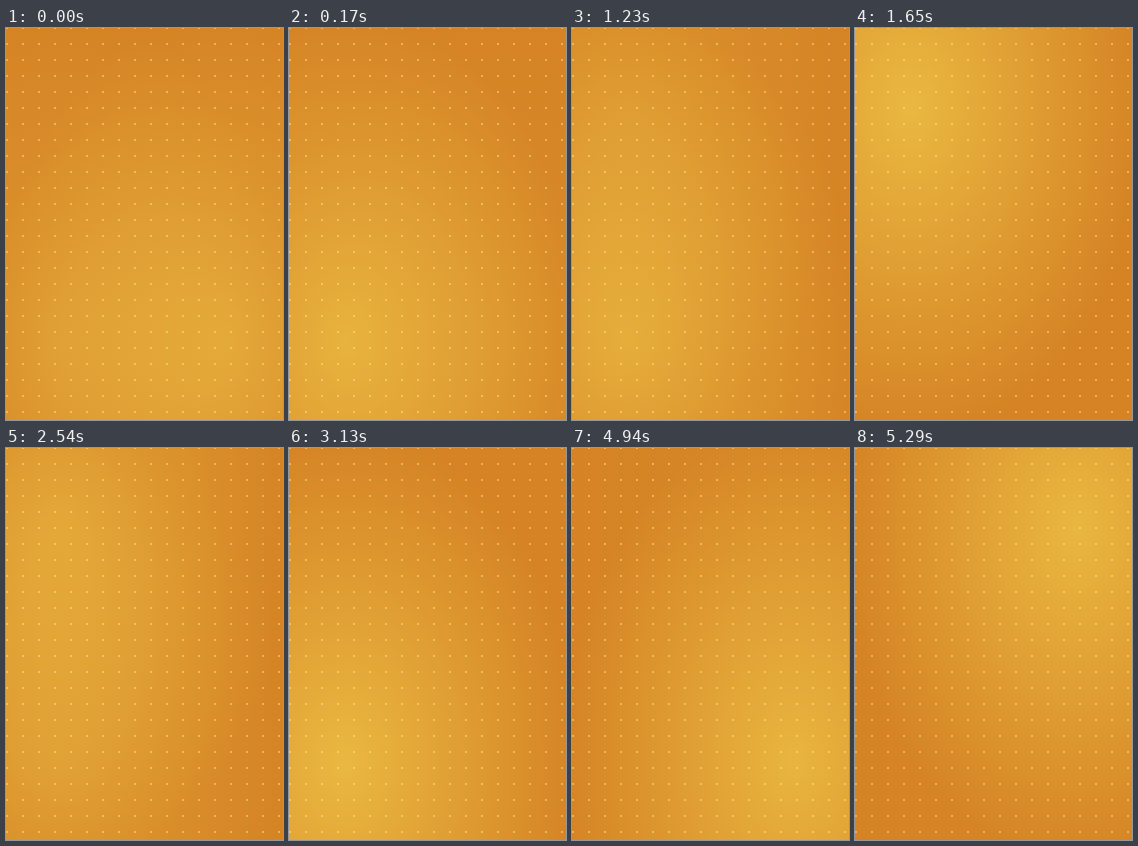
Write an HTML page that moves like this. It is 277 by 392 pixels and loops after 5650 ms.

```html
<!DOCTYPE html>
<html lang="en">
<head>
<meta charset="utf-8">
<title>Drifting glow</title>
<style>
  html, body { margin: 0; height: 100%; overflow: hidden; background: #d58324; }
  .layer { position: absolute; inset: 0; }
  .glow { background: radial-gradient(ellipse farthest-corner at var(--at), #eab841, #d58324 75%); }
  .dots {
    background: radial-gradient(circle at 1px 1px, rgba(255, 232, 160, .47) 1px, transparent 1.1px) 0 -1px / 16px 16px;
  }
</style>
</head>
<body>
<div class="layer glow" id="base"></div>
<div class="layer glow" id="next"></div>
<div class="layer dots"></div>
<script>
const LOOP = 5650;
const PERIOD = 1265; // from one crossfade to the next
const FADE = 500;
const LEAD = 210;    // the loop opens this far into the first crossfade
const stops = ['80% 80%', '20% 80%', '20% 20%', '20% 80%', '80% 80%', '80% 20%'];

const base = document.getElementById('base');
const next = document.getElementById('next');
const smooth = u => u * u * (3 - 2 * u);

function draw() {
  const time = performance.now() % LOOP + LEAD;
  const index = Math.floor(time / PERIOD);
  base.style.setProperty('--at', stops[index]);
  next.style.setProperty('--at', stops[index + 1]);
  next.style.opacity = smooth(Math.min(1, time % PERIOD / FADE));
  requestAnimationFrame(draw);
}
draw();
</script>
</body>
</html>
```
